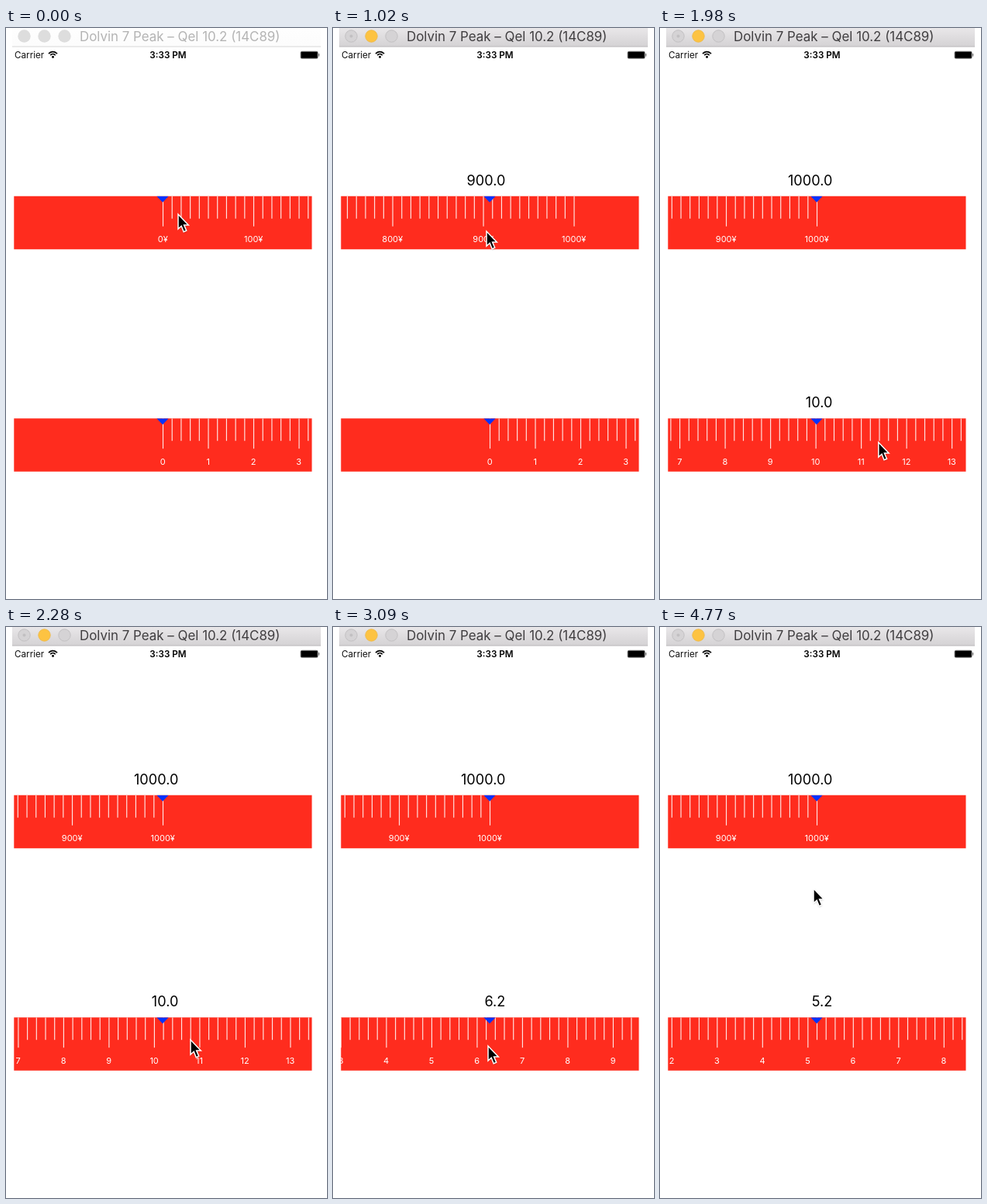
These frames come from a looping animation (414x736 px, 4.8 s). An HTML page with a canvas:

```html
<!DOCTYPE html>
<html lang="en">
<head>
<meta charset="utf-8">
<title>Ruler picker</title>
<style>
html, body { margin: 0; width: 100%; height: 100%; overflow: hidden; background: #fff; }
canvas { display: block; width: 414px; height: 736px; }
</style>
</head>
<body>
<canvas id="stage"></canvas>
<script>
const W = 414, H = 736, LOOP = 4800, STEP = 30;
const CENTER = 202.2, LEFT = 10.3, RIGHT = 394.5, RULER_HEIGHT = 68.5, TICK = 11.7;
const canvas = document.getElementById("stage");
const ctx = canvas.getContext("2d");
const dpr = window.devicePixelRatio || 1;
canvas.width = W * dpr;
canvas.height = H * dpr;

const progress = (t, start, duration) => Math.min(1, Math.max(0, (t - start) / duration));
const easeOut = (u, power) => 1 - (1 - u) ** power;
const mix = (a, b, u) => a + (b - a) * u;

// Steady drag to the end of the scale.
const moneyAt = t => 1000 * progress(t, 120, 992);

// A flick upwards, then a drag back that settles slowly.
const numberAt = t => 10.19 * easeOut(progress(t, 1350, 930), 3.64)
  - 4.99 * easeOut(progress(t, 2280, 2710), 4.3);

const money = { top: 216.8, step: 10, perMajor: 10, max: 1000, unit: "¥", valueAt: moneyAt };
const number = { top: 503.3, step: 0.2, perMajor: 5, max: 20, unit: "", valueAt: numberAt };

// The pointer swings sideways over a ruler and moves straight between rulers.
const stops = [
  { t: 0, x: 222, y: 240 },
  { t: 1020, x: 198, y: 262 },
  { t: 1380, x: 240, y: 540 },
  { t: 2280, x: 238, y: 532 },
  { t: 3090, x: 200, y: 540 },
  { t: 3840, x: 228, y: 527 },
  { t: 4350, x: 250, y: 540 },
  { t: 4770, x: 198, y: 337 }
];

function cursorAt(t) {
  const next = Math.max(1, stops.findIndex(s => s.t >= t));
  const a = stops[next - 1], b = stops[next];
  const u = progress(t, a.t, b.t - a.t);
  const swing = Math.abs(b.y - a.y) < 30 ? 50 * Math.sin(u * Math.PI * 4) : 0;
  const eased = u * u * (3 - 2 * u);
  return [mix(a.x, b.x, eased) + swing, mix(a.y, b.y, eased)];
}

function text(str, x, y, size, color, align = "left", weight = 400) {
  ctx.font = `${weight} ${size}px Inter, Roboto, sans-serif`;
  ctx.fillStyle = color;
  ctx.textAlign = align;
  ctx.fillText(str, x, y);
}

function polygon(points) {
  ctx.beginPath();
  points.forEach(([x, y]) => ctx.lineTo(x, y));
  ctx.closePath();
}

function disc(x, y, r, fill, stroke) {
  ctx.beginPath();
  ctx.arc(x, y, r, 0, Math.PI * 2);
  ctx.fillStyle = fill;
  ctx.fill();
  if (stroke) {
    ctx.strokeStyle = stroke;
    ctx.lineWidth = 1;
    ctx.stroke();
  }
}

function drawTitleBar(active) {
  const shade = ctx.createLinearGradient(0, 0, 0, 24);
  shade.addColorStop(0, active ? "#e9e7e9" : "#fefefe");
  shade.addColorStop(1, active ? "#d4d2d4" : "#fcfcfc");
  ctx.fillStyle = shade;
  ctx.fillRect(8, 0, 398, 24);
  ctx.fillStyle = active ? "#b9b7b9" : "#d8d8d8";
  ctx.fillRect(8, 23.5, 398, 1);
  for (let i = 0; i < 3; i++) {
    const x = 23.5 + i * 26;
    if (!active) disc(x, 10.5, 8.2, "#dddddd");
    else if (i === 1) disc(x, 10.5, 7.7, "#fdc342", "#f0bb48");
    else disc(x, 10.5, 7.7, "#d5d3d5", "#c2c0c2");
  }
  if (active) disc(23.5, 10.5, 2, "#c2c0c2");
  text("Dolvin 7 Peak – Qel 10.2 (14C89)", 95, 17, 16.9, active ? "#403e40" : "#b4b4b4");
}

function drawStatusBar() {
  text("Carrier", 11, 39, 11.7, "#111");
  text("3:33 PM", 209, 39, 11.7, "#000", "center", 600);
  ctx.strokeStyle = "#000";
  ctx.lineWidth = 1.7;
  for (const r of [4.3, 7.3]) {
    ctx.beginPath();
    ctx.arc(60.5, 38, r, -Math.PI * 0.77, -Math.PI * 0.23);
    ctx.stroke();
  }
  disc(60.5, 37.2, 1.5, "#000");
  ctx.fillStyle = "#777";
  ctx.beginPath();
  ctx.roundRect(379.6, 29.8, 23, 9.9, 2.5);
  ctx.fill();
  ctx.fillRect(403, 33, 1.2, 3.5);
  ctx.fillStyle = "#000";
  ctx.fillRect(380.6, 30.8, 21, 7.9);
}

function drawRuler(ruler, t) {
  const { top, step, perMajor, max, unit } = ruler;
  const value = ruler.valueAt(t);
  const offset = value / step;
  const count = Math.round(max / step);
  ctx.save();
  ctx.beginPath();
  ctx.rect(LEFT, top, RIGHT - LEFT, RULER_HEIGHT);
  ctx.clip();
  ctx.fillStyle = "#ff2c1e";
  ctx.fillRect(0, top - 1, W, RULER_HEIGHT + 2);
  for (let i = 0; i <= count; i++) {
    const x = CENTER + (i - offset) * TICK;
    if (x < LEFT - 20 || x > RIGHT + 20) continue;
    const major = i % perMajor === 0;
    ctx.fillStyle = "rgba(255,255,255,.88)";
    ctx.fillRect(x - 0.25, top, 1.15, major ? 38.9 : 28.9);
    if (major) text(Math.round(i * step) + unit, x, top + 59.4, 11, "#fff", "center");
  }
  polygon([[194.3, top], [209.7, top], [202, top + 8]]);
  ctx.fillStyle = "#0433ff";
  ctx.fill();
  ctx.restore();
  if (value > 0) {
    const shown = Math.floor(offset + 1e-6) * step;
    text(shown.toFixed(1), 222.3, top - 13.9, 18.1, "#000", "right");
  }
}

function drawCursor(t) {
  if (t >= 1560 && t < 1770) return;
  const [x, y] = cursorAt(t);
  ctx.save();
  ctx.translate(x, y);
  polygon([[0, 0], [0, 19], [4.2, 15.2], [7.2, 22.7], [10.7, 21.2], [7.6, 13.9], [13.3, 13.9]]);
  ctx.shadowColor = "rgba(0,0,0,.35)";
  ctx.shadowBlur = 2 * dpr;
  ctx.shadowOffsetY = dpr;
  ctx.fillStyle = "#fff";
  ctx.fill();
  ctx.shadowColor = "transparent";
  ctx.fillStyle = "#000";
  ctx.fill();
  ctx.strokeStyle = "#fff";
  ctx.lineWidth = 1.5;
  ctx.stroke();
  ctx.restore();
}

function draw(now) {
  const t = Math.floor((now % LOOP) / STEP) * STEP;
  ctx.setTransform(dpr, 0, 0, dpr, 0, 0);
  ctx.fillStyle = "#fff";
  ctx.fillRect(0, 0, W, H);
  drawTitleBar(t >= 60);
  drawStatusBar();
  drawRuler(money, t);
  drawRuler(number, t);
  drawCursor(t);
}

let start;
function tick(now) {
  start ??= now;
  draw(now - start);
  requestAnimationFrame(tick);
}
draw(0);
requestAnimationFrame(tick);
</script>
</body>
</html>
```
